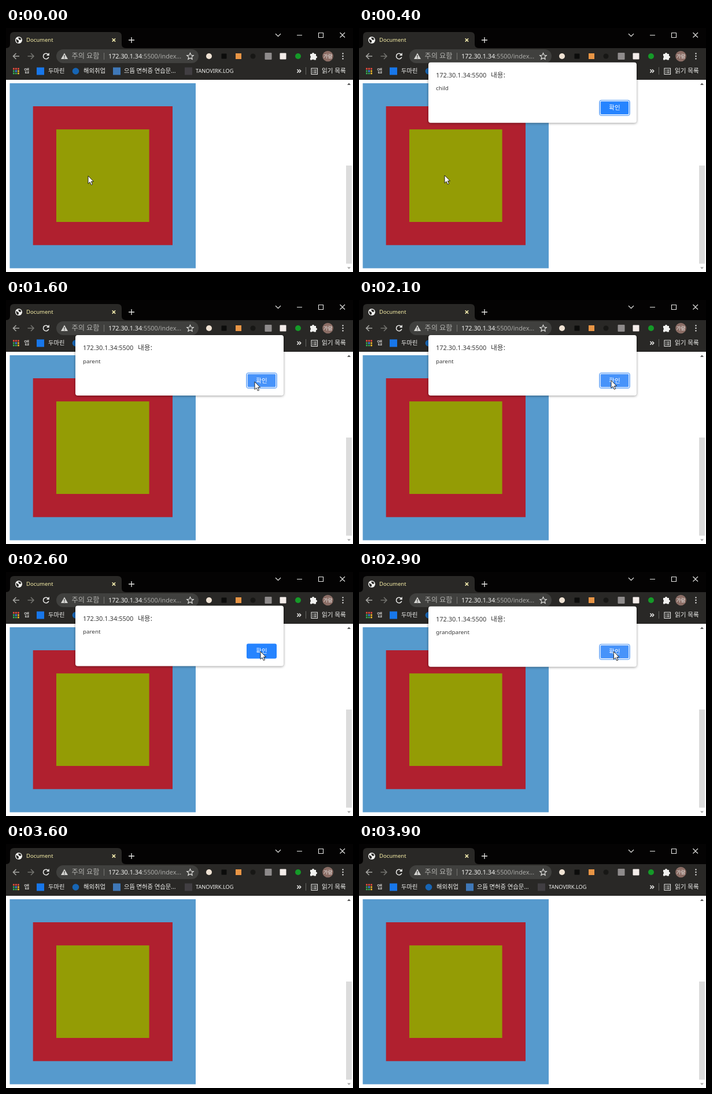
Write an HTML page that moves like this. It is 600 by 424 pixels and loops after 4000 ms.

```html
<!DOCTYPE html>
<html lang="ko">
<head>
<meta charset="utf-8">
<title>Document</title>
<style>
  html, body { margin: 0; width: 100%; height: 100%; overflow: hidden; background: #fff; }
  svg { display: block; width: 600px; height: 424px; }
  text { font: 10.3px "Noto Sans", "Noto Sans CJK KR", sans-serif; fill: #f1f1ef; white-space: pre; }
  .line { fill: none; stroke: #e8e8e6; stroke-width: 1.1; }
  .bold { stroke-width: 1.6; }
  #panel { filter: drop-shadow(0 1px 2px rgba(0, 0, 0, .4)); }
  #dialog text { fill: #3a3a3a; }
  #dialog .ok { fill: #fff; font-size: 10.5px; font-weight: 500; text-anchor: middle; }
</style>
</head>
<body>
<svg viewBox="0 0 600 424">
  <!-- window frame -->
  <rect width="600" height="36" fill="#040303"/>
  <rect y="35" width="600" height="55" fill="#292826"/>
  <path d="M0 35Q7 35 7 28V14Q7 7 14 7H193Q200 7 200 14V28Q200 35 207 35Z" fill="#292826"/>
  <circle cx="22" cy="21" r="6" fill="#f2f2f0"/>
  <path d="M17.5 19L20 20.5L22 22V24L20.5 26Q17 24 17.5 19ZM21 16.5L25 17L26.5 20L24 21L22 19.5Z" fill="#292826"/>
  <text x="35" y="24.4" style="font-size:9.5px;fill:#f8f0a8">Document</text>
  <path class="line bold" d="M183.7 18.2l5.4 5.4m0-5.4l-5.4 5.4" style="stroke:#f6efb0"/>
  <path class="line bold" d="M212 21h10m-5-5v10" style="stroke-width:1.3"/>
  <path class="line" d="M466 10l4.5 4.5l4.5-4.5M503 12.5h9M540.5 8.5h8v8h-8ZM577.5 8l8.5 8.5m0-8.5l-8.5 8.5"/>

  <!-- toolbar -->
  <path class="line bold" d="M23 49H12.5m5-5l-5 5l5 5" style="stroke:#a5a5a2"/>
  <path class="line bold" d="M37.5 49H48m-5-5l5 5l-5 5" style="stroke:#73736f"/>
  <path class="line bold" d="M73 46A4.8 4.8 0 1 0 73.8 50.5"/>
  <path d="M74.8 43v5h-5Z" fill="#e8e8e6"/>
  <rect x="87" y="37" width="246" height="24" rx="12" fill="#40403e"/>
  <path d="M101 43.5L107 54H95Z" fill="#d5d5d2"/>
  <path d="M101 47v3.5m0 1v1.4" stroke="#40403e" stroke-width="1.3"/>
  <text x="113.5" y="53" style="font-size:12.2px;fill:#b2b2af">주의 요함</text>
  <path d="M169.5 43v12" stroke="#777774"/>
  <text x="177" y="53" style="font-size:10.8px">172.30.1.34<tspan fill="#aaaaa7">:5500/index...</tspan></text>
  <path class="line" d="M318.5 43.4l1.7 3.8 4.1.4-3.1 2.7.9 4-3.6-2.1-3.6 2.1.9-4-3.1-2.7 4.1-.4Z"/>
  <g id="extensions"></g>
  <path d="M526 45h3a2 2 0 1 1 4 0h3v3.5a2 2 0 1 1 0 4v3h-3.5a2 2 0 0 0-3.5 0H526v-3.5a2 2 0 0 0 0-3.5Z" fill="#f1f1ef"/>
  <circle cx="556.5" cy="49" r="9.3" fill="#8b6d65"/>
  <text x="556.5" y="52" text-anchor="middle" style="font-size:8.5px">가람</text>
  <path d="M582.5 44.5h.01m-.01 4.5h.01m-.01 4.5h.01" stroke="#eee" stroke-width="2.3" stroke-linecap="round"/>

  <!-- bookmarks -->
  <g id="apps"></g>
  <text x="31" y="78.4">앱</text>
  <rect x="53" y="68.5" width="13" height="13" fill="#1877ea"/>
  <text x="73" y="78.4">두마린</text>
  <circle cx="120.5" cy="75" r="5.8" fill="#1765b4"/>
  <text x="134" y="78.4">해외취업</text>
  <rect x="185" y="68.5" width="13" height="13" fill="#3f78b8"/>
  <text x="204" y="78.4">으뜸 면허증 연습문...</text>
  <rect x="309" y="68.5" width="13" height="13" fill="#413e42"/>
  <text x="328" y="78.4" style="font-size:9.2px">TANOVIRK.LOG</text>
  <path class="line bold" d="M503.5 72l2.7 2.8l-2.7 2.8m3.5-5.6l2.7 2.8l-2.7 2.8"/>
  <path d="M518.5 68v13" stroke="#666663"/>
  <path class="line" d="M528 70h10.5v10.5H528ZM530 73h1.2m1.3 0h4.2M530 75.3h1.2m1.3 0h4.2M530 77.6h1.2m1.3 0h4.2"/>
  <text x="546" y="78.4" style="font-size:10.6px">읽기 목록</text>

  <!-- page -->
  <rect y="90" width="600" height="334" fill="#fff"/>
  <rect x="6.5" y="96" width="321.5" height="321.5" fill="#569acd"/>
  <rect x="46.7" y="136" width="241.3" height="241.3" fill="#b0202f"/>
  <rect x="87" y="176.2" width="160.6" height="160.8" fill="#949c05"/>
  <path d="M590 99l3-3.5l3 3.5Z" fill="#555"/>
  <rect x="588" y="239" width="10" height="170.5" fill="#dcdcdc"/>
  <path d="M590 415.5l3 3.5l3-3.5Z" fill="#a5a5a5"/>

  <g id="dialog">
    <rect id="panel" x="120" y="61" width="360" height="105" rx="4" fill="#fff"/>
    <text x="133" y="87.3" style="font-size:11px;font-weight:300">172.30.1.34:5500 <tspan x="228" style="font-size:11.8px">내용:</tspan></text>
    <text id="message" x="133" y="109.6" style="font-size:9.8px"></text>
    <rect id="button" x="416" y="127" width="52" height="26" rx="3"/>
    <g id="ring" fill="none">
      <rect x="415.5" y="126.5" width="53" height="27" rx="3.5" stroke="#79b0f5"/>
      <rect x="417.2" y="128.2" width="49.6" height="23.6" rx="2" stroke="#fff" stroke-width="1.2"/>
    </g>
    <text class="ok" x="442" y="143.7">확인</text>
  </g>

  <path id="cursor" d="M0 0V13.5L3.1 10.7L5.3 15.7L7.6 14.7L5.4 9.8H9.5Z" fill="#fff" stroke="#111" stroke-width=".9"/>
</svg>
<script>
const LOOP = 4000, STEP = 100;
const $ = id => document.getElementById(id);

function add(parent, tag, attrs) {
  const el = document.createElementNS("http://www.w3.org/2000/svg", tag);
  for (const key in attrs) el.setAttribute(key, attrs[key]);
  parent.append(el);
}

// Toolbar badges: centre, radius, colour, corner rounding
[[351, 5, "#efe2d3", 5], [377, 4.5, "#0c0c0b", 1], [402, 5, "#e89545", 0],
 [427, 4.5, "#171715", 4.5], [453.5, 6, "#8e8b8b", 1], [479, 5.5, "#f3ece9", 1],
 [505, 5, "#159a28", 5]].forEach(([x, r, fill, rx]) =>
  add($("extensions"), "rect", { x: x - r, y: 49 - r, width: 2 * r, height: 2 * r, rx, fill }));

const dots = ["#e94b3c", "#e94b3c", "#e94b3c", "#35a853", "#4286f5", "#f5b92c", "#35a853", "#35a853", "#f5b92c"];
dots.forEach((fill, i) => add($("apps"), "rect",
  { x: 12 + i % 3 * 4, y: 69.5 + Math.floor(i / 3) * 4, width: 2.8, height: 2.8, fill }));

const dialogs = [
  { text: "child", open: 300, close: 1200 },
  { text: "parent", open: 1400, close: 2500 },
  { text: "grandparent", open: 2800, close: 3200 }
];
// time, x, y
const path = [[0, 142, 257], [400, 148, 256], [700, 148, 256], [1000, 418.5, 155], [1200, 430, 142],
  [1800, 430, 142], [2300, 440, 138], [2600, 440, 138], [3400, 441, 138.5]];

function cursorAt(t) {
  const i = path.findIndex(p => p[0] > t);
  if (i < 0) return path[path.length - 1].slice(1);
  const [a, b] = [path[i - 1], path[i]];
  const k = (t - a[0]) / (b[0] - a[0]);
  return [a[1] + (b[1] - a[1]) * k, a[2] + (b[2] - a[2]) * k];
}

function draw(t) {
  const [x, y] = cursorAt(t);
  $("cursor").setAttribute("transform", `translate(${x} ${y})`);
  $("cursor").style.display = t < 3600 ? "" : "none";

  const d = dialogs.find(d => t >= d.open && t <= d.close + 200 && !dialogs.some(n => n.open > d.open && t >= n.open));
  $("dialog").style.display = d ? "" : "none";
  if (!d) return;
  const opening = Math.min(1, (t - d.open) / 200);
  const closing = Math.max(0, (t - d.close) / 200);
  const lift = 5 * (1 - opening) ** 2 + 5 * closing;
  const hover = x > 416 && x < 468 && y > 127 && y < 153;
  $("dialog").setAttribute("transform", `translate(0 ${-lift})`);
  $("dialog").setAttribute("opacity", Math.min(1, .4 + opening * 1.2));
  $("message").textContent = d.text;
  $("ring").style.display = closing ? "none" : "";
  $("button").setAttribute("fill", hover && !closing ? "#4793fa" : "#2684ff");
}

function tick(now) {
  draw(Math.floor(now % LOOP / STEP) * STEP);
  requestAnimationFrame(tick);
}
draw(0);
requestAnimationFrame(tick);
</script>
</body>
</html>
```
